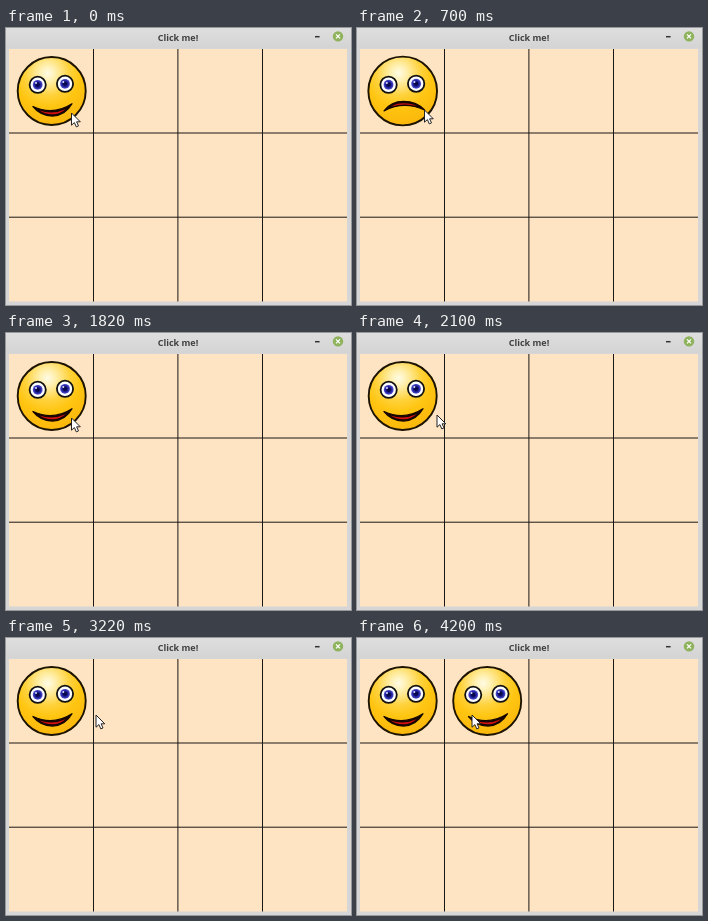
Write an HTML page that moves like this. It is 345x277 px and loops after 4900 ms.

```html
<!DOCTYPE html>
<html lang="en">
<meta charset="utf-8">
<title>Click me!</title>
<style>
  html, body { margin: 0; height: 100%; overflow: hidden; background: #d6d6d6; }
  svg { display: block; width: 100vw; height: 100vh; }
  .title { font: bold 9px "Open Sans", "Noto Sans", sans-serif; fill: #404040; text-anchor: middle; }
</style>
<svg viewBox="0 0 345 277">
  <defs>
    <linearGradient id="bar" x2="0" y2="1">
      <stop stop-color="#dedede"/>
      <stop offset="1" stop-color="#d4d4d4"/>
    </linearGradient>
    <radialGradient id="skin" cx=".44" cy=".24" r=".72">
      <stop stop-color="#fffbe6"/>
      <stop offset=".16" stop-color="#fff0b0"/>
      <stop offset=".45" stop-color="#ffd23c"/>
      <stop offset=".68" stop-color="#ffc511"/>
      <stop offset="1" stop-color="#fcb90c"/>
    </radialGradient>
    <radialGradient id="iris">
      <stop offset=".3" stop-color="#08084a"/>
      <stop offset=".65" stop-color="#2424a8"/>
      <stop offset="1" stop-color="#5656c8"/>
    </radialGradient>
    <g id="eye">
      <circle r="8.1" fill="#fff" stroke="#111" stroke-width="1.8"/>
      <circle r="4.9" fill="url(#iris)"/>
      <circle cx="-1.7" cy="-1.7" r="1" fill="#dcdcff"/>
    </g>
    <g id="head">
      <circle cx="45.7" cy="63" r="34" fill="url(#skin)" stroke="#1c1302" stroke-width="1.9"/>
      <use href="#eye" x="31.7" y="56.8"/>
      <use href="#eye" x="59" y="55.8"/>
    </g>
    <g id="happy">
      <use href="#head"/>
      <path d="M27 78.5Q47 88 66 75.8Q59 88 46.5 88Q34 87.5 27 78.5Z" fill="#160600" stroke="#160600" stroke-width="1.3" stroke-linejoin="round"/>
      <path d="M33.5 82.6Q47 87 59.5 81.2Q54 86.2 46.5 86.2Q38.5 86.2 33.5 82.6Z" fill="#d51010"/>
    </g>
    <g id="sad">
      <use href="#head" transform="translate(45.7 63) scale(1.01) translate(-45.7 -63)"/>
      <path d="M27 82.8Q34 73.3 46.5 73.3Q60 73.3 67.5 82Q47 72.5 27 82.8Z" fill="#160600" stroke="#160600" stroke-width="1.3" stroke-linejoin="round"/>
      <path d="M34.5 78.4Q39 75.2 46.5 75.2Q54.5 75.2 60 78Q47 74.6 34.5 78.4Z" fill="#c91010"/>
    </g>
  </defs>

  <path fill="#d6d6d6" d="M0 0H345V277H0Z"/>
  <path fill="url(#bar)" d="M0 0H345V20H0Z"/>
  <text class="title" x="172" y="12.6">Click me!</text>
  <path d="M309 8.7h4.6" stroke="#333" stroke-width="1.5"/>
  <circle cx="332" cy="8.4" r="5.2" fill="#8fb35c"/>
  <path d="M330 6.4l4 4m0-4l-4 4" stroke="#fff" stroke-width="1.3"/>

  <path fill="#ffe4c4" d="M3 21H341V273.5H3Z"/>
  <path d="M87.5 21V273.5M171.9 21V273.5M256.5 21V273.5M3 105H341M3 189.2H341" stroke="#1a1714"/>

  <use id="first" href="#happy"/>
  <use id="second" href="#happy" x="84.5"/>
  <path id="cursor" d="M0 0V12.2L2.9 9.6L4.8 13.9L7 12.9L5.1 8.8H8.8Z" fill="#fff" stroke="#222" stroke-linejoin="round"/>
</svg>
<script>
  const STEP = 700;
  const steps = [
    { x: 65.5, y: 85 },
    { x: 67.5, y: 82, sad: true },
    { x: 65.5, y: 85 },
    { x: 80, y: 82 },
    { x: 90, y: 77 },
    { x: 105, y: 80 },
    { x: 115, y: 77, both: true },
  ];
  const [first, second, cursor] = ["first", "second", "cursor"].map(id => document.getElementById(id));

  function draw() {
    const { x, y, sad, both } = steps[Math.floor(performance.now() / STEP) % steps.length];
    first.setAttribute("href", sad ? "#sad" : "#happy");
    second.setAttribute("visibility", both ? "visible" : "hidden");
    cursor.setAttribute("transform", `translate(${x} ${y})`);
    requestAnimationFrame(draw);
  }
  draw();
</script>
</html>
```
